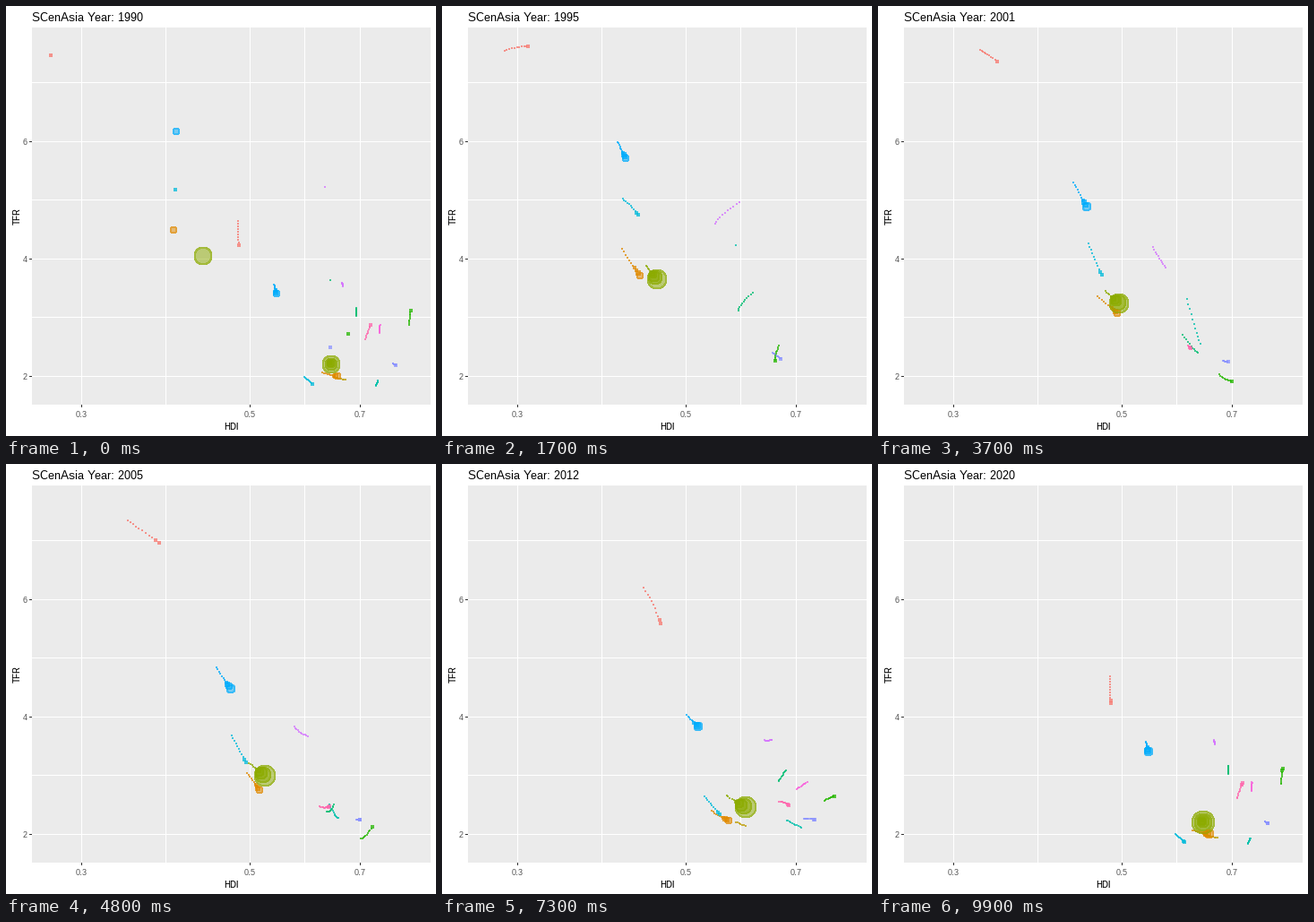
A matplotlib script that plays this animation: 480 by 480 pixels, repeating every 10000 ms.

```python
import numpy as np
import matplotlib.pyplot as plt
from matplotlib.animation import FuncAnimation
from matplotlib.patches import Rectangle

SIZE, DPI = 480, 72
FRAMES, INTERVAL = 100, 100
START, END = 1990, 2020
KEY_YEARS = np.array([1990, 1995, 2001, 2009, 2015, 2020])
WAKE = 10
COUNTRIES = 13
GROWTH = 1.6
MAX_POP, MAX_SIZE = 1396, 12

plt.rcParams.update({"font.family": "Liberation Sans", "text.hinting": "native",
                     "text.hinting_factor": 1})


def px(hdi):
    """Log scale for the horizontal axis."""
    return 272 + 367.4 * np.log(np.asarray(hdi) / 0.5)


def py(tfr):
    return 544.3 - 65.5 * np.asarray(tfr)


def frame_of(year):
    return np.ceil((year - START) * (FRAMES / (END - START) - 0.03))


def hue_color(i):
    """Evenly spaced hue at fixed chroma and lightness (CIE LUV to sRGB)."""
    light, chroma, h = 65, 100, np.radians(15 + 360 * i / COUNTRIES)
    y = ((light + 16) / 116) ** 3
    u = chroma * np.cos(h) / (13 * light) + 0.1978
    v = chroma * np.sin(h) / (13 * light) + 0.4683
    x = 9 * y * u / (4 * v)
    z = 3 * y / v - x / 3 - 5 * y
    rgb = np.array([3.2405 * x - 1.5372 * y - 0.4985 * z,
                    -0.9693 * x + 1.8760 * y + 0.0416 * z,
                    0.0556 * x - 0.2040 * y + 1.0573 * z]).clip(0, 1)
    return np.where(rgb > 0.0031, 1.055 * rgb ** (1 / 2.4) - 0.055, 12.92 * rgb)


def glide(f, keys, values):
    """Smooth curve (cubic Hermite) through the key points."""
    slope = np.gradient(values, keys)
    k = np.clip(np.searchsorted(keys, f, side="right") - 1, 0, len(keys) - 2)
    h = keys[k + 1] - keys[k]
    t = (f - keys[k]) / h
    ease = t * t * (3 - 2 * t)
    return (values[k] * (1 - ease) + values[k + 1] * ease
            + h * t * (1 - t) * (slope[k] * (1 - t) - slope[k + 1] * t))


def track(pop, *path, since=START):
    """Path of (hdi, tfr) over the last key years; pop in millions at the start."""
    f = np.arange(FRAMES)
    keys = frame_of(KEY_YEARS[-len(path):])
    hdi, tfr = np.array(path).T
    x, y = glide(f, keys, px(hdi)), glide(f, keys, py(tfr))
    x[f < frame_of(since)] = np.nan
    size = MAX_SIZE * np.sqrt(pop * GROWTH ** (f / FRAMES) / MAX_POP)
    return x, y, size


tracks = [
    # Afghanistan
    track(16, (.273, 7.475), (.310, 7.625), (.3425, 7.37), (.440, 6.20), (.478, 4.98), (.484, 4.19)),
    # Bangladesh
    track(103, (.397, 4.50), (.435, 3.72), (.4935, 3.07), (.541, 2.40), (.602, 2.12), (.6555, 1.99)),
    # Bhutan
    track(.6, (.572, 2.25), (.627, 2.04), (.671, 1.93), since=2010),
    # India
    track(870, (.434, 4.05), (.458, 3.66), (.4966, 3.24), (.566, 2.66), (.6285, 2.30), (.642, 2.20)),
    # Kazakhstan
    track(14, (.674, 2.72), (.656, 2.26), (.699, 1.92), (.763, 2.57), (.805, 2.73), (.816, 3.14)),
    # Kyrgyzstan
    track(4.4, (.639, 3.64), (.587, 3.12), (.630, 2.40), (.663, 2.90), (.690, 3.21), (.6905, 3.01)),
    # Maldives
    track(.3, (.583, 4.24), (.635, 2.56), (.680, 2.24), (.737, 1.99), (.733, 1.83), since=1995),
    # Nepal
    track(19, (.399, 5.18), (.433, 4.75), (.471, 3.73), (.5295, 2.65), (.578, 2.11), (.606, 1.855)),
    # Pakistan
    track(125, (.4005, 6.17), (.417, 5.71), (.450, 4.885), (.502, 4.03), (.534, 3.67), (.5425, 3.40)),
    # Sri Lanka
    track(16, (.638, 2.49), (.668, 2.30), (.691, 2.25), (.7155, 2.27), (.7645, 2.23), (.781, 2.19)),
    # Tajikistan
    track(6, (.6285, 5.23), (.547, 4.60), (.571, 3.855), (.635, 3.60), (.659, 3.63), (.664, 3.53)),
    # Turkmenistan
    track(4, (.632, 2.50), (.700, 2.77), (.740, 2.95), (.742, 2.72), since=2005),
    # Uzbekistan
    track(21, (.580, 2.90), (.617, 2.48), (.6645, 2.56), (.701, 2.50), (.723, 2.90), since=2000),
]
X, Y, S = (np.array(v) for v in zip(*tracks))
RGBA = np.array([[*hue_color(i), 0.5] for i in range(COUNTRIES)])

fig = plt.figure(figsize=(SIZE / DPI, SIZE / DPI), dpi=DPI, facecolor="white")
ax = fig.add_axes([0, 0, 1, 1])
ax.set(xlim=(0, SIZE), ylim=(SIZE, 0))
ax.axis("off")

# Panel, grid and axes
ax.add_patch(Rectangle((29, 24), 445, 421, fc="#EBEBEB", ec="none", zorder=0))
grid = dict(color="white", lw=1, zorder=1, snap=False)
tick = dict(color="#333333", lw=1, snap=False)
label = dict(size=9, color="#4D4D4D")
ax.vlines(np.floor(px([.3, .15 ** .5, .5, .35 ** .5, .7])) + 0.5, 24, 445, **grid)
ax.hlines(np.floor(py(np.arange(2, 8))) + 0.5, 29, 474, **grid)
for hdi in (0.3, 0.5, 0.7):
    x = np.floor(px(hdi)) + 0.5
    ax.vlines(x, 445, 448, **tick)
    ax.text(x, 459, hdi, ha="center", **label)
for tfr in (2, 4, 6):
    y = np.floor(py(tfr)) + 0.5
    ax.hlines(y, 26, 29, **tick)
    ax.text(24, y + 3.5, tfr, ha="right", **label)
ax.text(251.5, 473, "HDI", size=11, ha="center")
ax.text(15.5, 235, "TFR", size=11, ha="center", va="baseline",
        rotation=90, rotation_mode="anchor")
title = ax.text(29, 17, "", size=13)
discs = ax.scatter([], [], linewidths=0, antialiased=False, zorder=3)
rims = ax.scatter([], [], linewidths=1, antialiased=False, zorder=4)


def draw(i):
    lags = np.arange(WAKE, -1, -1)
    f = (i - lags) % FRAMES
    falloff = (1 - lags / (WAKE + 1)) ** 3
    x, y = X[:, f].T.ravel(), Y[:, f].T.ravel()
    size = (S[:, f] * falloff).T.ravel()
    seen = ~np.isnan(x)
    # Dots sit on whole pixels with whole radii
    spots = np.rint(np.column_stack([x, y])[seen])
    radius = np.maximum(1, np.rint(0.375 * (size * 2.845 + 0.94)))[seen]
    rgba = np.tile(RGBA, (len(f), 1))[seen]
    for dots, diameter in ((discs, 2 * radius), (rims, 2 * radius - 1)):
        dots.set_offsets(spots)
        dots.set_sizes(diameter ** 2)
    discs.set_facecolors(rgba)
    rims.set_facecolors("none")
    rims.set_edgecolors(rgba)
    year = round(START + (END - START) * i / (FRAMES - 1))
    title.set_text(f"SCenAsia Year: {year}")
    return discs, rims, title


anim = FuncAnimation(fig, draw, frames=FRAMES, interval=INTERVAL,
                     repeat=True, repeat_delay=0, blit=False)
plt.show()
```
